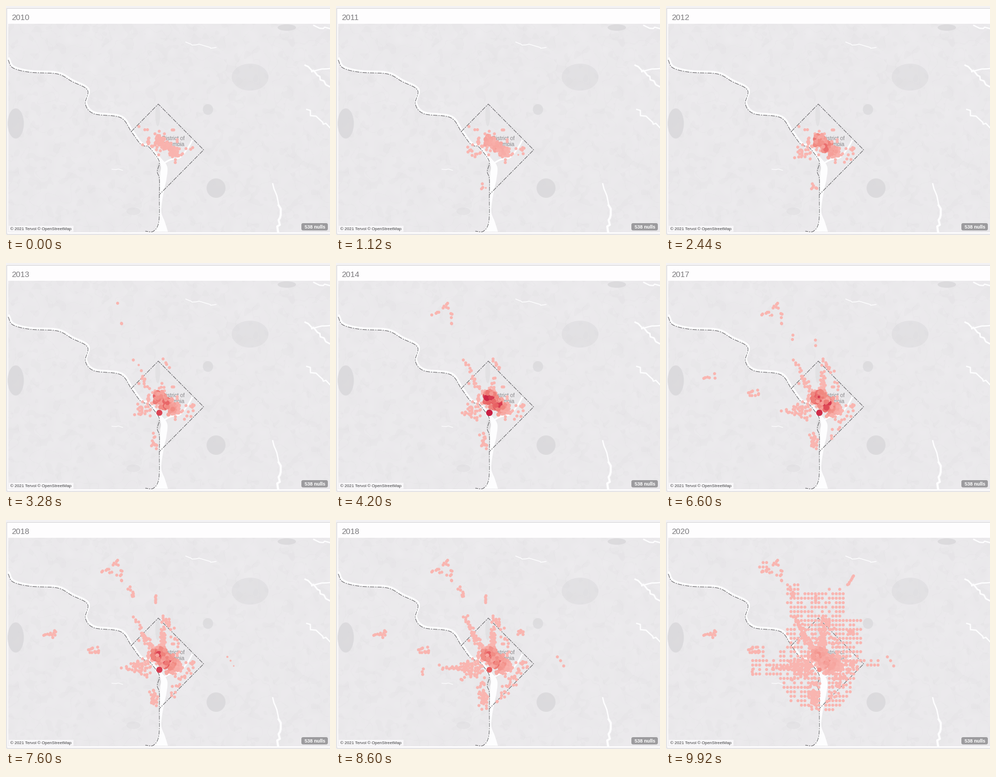
Recreate the animation shown at these times as a matplotlib script. Size 600 by 425 pixels, loop 9.96 s.

```python
import numpy as np
import matplotlib.pyplot as plt
from matplotlib.animation import FuncAnimation
from matplotlib.colors import LinearSegmentedColormap
from matplotlib.patches import Ellipse, FancyBboxPatch, Polygon, Rectangle
from matplotlib.path import Path

W, H, STEP, LOOP = 600, 425, 40, 9960
PX = 0.72  # points per pixel at 100 dpi
WATER = "#fdfdfe"
rng = np.random.default_rng(11)

fig = plt.figure(figsize=(W / 100, H / 100), dpi=100, facecolor="#f3f2f4")
ax = fig.add_axes([0, 0, 1, 1])
ax.set(xlim=(0, W), ylim=(H, 0))
ax.axis("off")


def line(xy, color, width, **kw):
    ax.plot(*np.asarray(xy).T, color=color, lw=width * PX, zorder=3, **kw)


def label(x, y, s, size, color, **kw):
    kw = {"family": "Liberation Sans", "va": "center_baseline", "zorder": 4} | kw
    return ax.text(x, y, s, fontsize=size * PX, color=color, **kw)


def smooth(points, n=8):
    """Catmull-Rom curve through the points."""
    p = np.array(points, float)
    p = np.vstack([2 * p[0] - p[1], p, 2 * p[-1] - p[-2]])
    u = np.linspace(0, 1, n, endpoint=False)[:, None]
    parts = [b + u * (c - a) / 2 + u ** 2 * (a - 2.5 * b + 2 * c - d / 2)
             + u ** 3 * (1.5 * (b - c) + (d - a) / 2)
             for a, b, c, d in zip(p, p[1:], p[2:], p[3:])]
    return np.vstack(parts + [p[-2:-1]])


# ---- base map ----
def noise(shape, scale):
    ky = np.fft.fftfreq(shape[0])[:, None]
    kx = np.fft.rfftfreq(shape[1])[None, :]
    soft = np.exp(-20 * scale ** 2 * (kx ** 2 + ky ** 2))
    n = np.fft.irfft2(np.fft.rfft2(rng.normal(size=shape)) * soft, shape)
    return n / n.std()


def draw_land():
    shape = (387, 596)
    tone = 235 + 0.6 * noise(shape, 6)
    tone -= 2.5 * (noise(shape, 4) > 1.0)
    tone -= 2 * (np.abs(noise(shape, 7)) < 0.09)
    rgb = tone[..., None] + np.array([0, -1.5, 1])
    ax.imshow(np.clip(rgb, 0, 255).astype(np.uint8), extent=(4, 600, 420, 33),
              interpolation="nearest", aspect="auto", zorder=1)
    parks = ((452, 132, 68, 50, 0.4), (18, 218, 30, 56, 0.7), (389, 338, 35, 36, 0.7),
             (374, 192, 19, 20, 0.6), (520, 40, 34, 12, 0.7), (281, 203, 9, 40, 0.4),
             (236, 381, 26, 14, 0.3))
    for x, y, w, h, alpha in parks:
        ax.add_patch(Ellipse((x, y), w, h, color="#d6d5d8", alpha=alpha, lw=0,
                             zorder=2))


def creek(x0, y0, x1, y1, width, wobble=4):
    n = max(4, int(np.hypot(x1 - x0, y1 - y0) / 6))
    path = np.linspace((x0, y0), (x1, y1), n)
    path[1:-1] += rng.uniform(-wobble, wobble, (n - 2, 2))
    line(path, WATER, width)


upper = smooth([(4, 100), (13, 115), (45, 123), (95, 126), (122, 140), (151, 156),
                (147, 182), (163, 200), (212, 207), (232, 233), (250, 257), (263, 260)])
bank = smooth([(263, 260), (271, 269), (284, 289), (280, 307), (284, 320), (284, 350),
               (283, 400), (273, 418), (258, 418)])
channel = smooth([(266, 260, 5), (282, 281, 8), (292, 298, 13), (291, 322, 12),
                  (288, 345, 8), (285, 380, 5), (288, 400, 12), (287, 419, 26)])
half = channel[:, 2:] / 2 * [1, 0]
basin = np.vstack([channel[:, :2] - half, (channel[:, :2] + half)[::-1]])


def draw_water():
    line(upper + [1.2, -2], WATER, 4.5)
    ax.add_patch(Polygon(basin, color=WATER, lw=0, zorder=3))
    ax.add_patch(Ellipse((283, 300), 8, 18, color="#dfdee0", lw=0, zorder=3))
    line(smooth([(292, 292), (305, 285), (322, 281), (337, 263), (346, 247)]), WATER, 3)

    creek(333, 67, 389, 77, 1.5)
    creek(554, 110, 600, 150, 3)
    creek(566, 122, 600, 116, 2.5)
    creek(557, 192, 600, 226, 2.5)
    creek(570, 36, 600, 42, 2.5)
    creek(494, 330, 505, 370, 2.5, 2)
    creek(505, 370, 504, 420, 4)
    creek(196, 303, 216, 305, 1.2, 2)

    for path in (np.vstack([upper, bank]),
                 [(232, 233), (282, 182), (366, 267), (284, 350)]):
        line(path, "#5f5e61", 1, dashes=(8, 1.8, 2.2, 1.8))


def draw_frame():
    ax.add_patch(Rectangle((0.5, 3.5), 602, 419, fc="#fefdfe", ec="#d5d4d6",
                           lw=PX, zorder=0))
    label(309.5, 244.5, "District of", 10, "#8b8a8d", ha="center")
    label(309.5, 256, "Columbia", 10, "#8b8a8d", ha="center")
    ax.add_patch(Rectangle((5, 408), 120, 11, fc="#f8f7f9", lw=0, zorder=3))
    label(7.5, 413.5, "© 2021 Tervol © OpenStreetMap", 7.8, "#3c3c3e")
    ax.add_patch(FancyBboxPatch((550, 406), 43, 7.5, fc="#9c9b9e", lw=0, zorder=3,
                                boxstyle="round,pad=3,rounding_size=3"))
    label(572, 409.7, "538 nulls", 9, "white", ha="center", weight="bold")


# ---- marks: x, y, weight, time of appearance ----
marks = []
OPEN, EARLY, MID = (-400, -200), (320, 1950), (2560, 4080)
LATER, SPREAD, LATE, LAST = (4200, 5560), (5680, 7480), (7600, 8300), (9480, 9800)


def add(xy, born, weight=0.0):
    columns = np.column_stack(np.broadcast_arrays(*np.transpose(xy), weight, born))
    marks.append(columns[~Path(basin).contains_points(columns[:, :2])])


def cloud(n, x, y, sx, sy, era):
    xy = np.clip(rng.normal(size=(n, 2)), -2, 2) * [sx, sy] + [x, y]
    add(xy, rng.uniform(*era, n))


def street(n, start, end, spread, era):
    xy = np.linspace(start, end, n) + rng.uniform(-spread, spread, (n, 2))
    add(xy, rng.uniform(*era, n))


def grid(outline, keep):
    """Rounded coordinates: a lattice of marks inside an outline."""
    lattice = np.stack(np.meshgrid(225 + 6.45 * np.arange(-24, 32),
                                   79 + 8.27 * np.arange(36)), -1).reshape(-1, 2)
    cells = lattice[Path(outline).contains_points(lattice)]
    cells = cells[rng.random(len(cells)) < keep]
    add(cells, rng.uniform(*LAST, len(cells)))


def box(x0, y0, x1, y1):
    return [(x0, y0), (x1, y0), (x1, y1), (x0, y1)]


def add_grid():
    grid([(222, 116), (243, 116), (262, 132), (330, 126), (328, 183), (363, 184),
          (363, 258), (345, 314), (330, 340), (300, 357), (262, 347), (230, 338),
          (209, 292), (209, 240), (230, 232), (222, 205), (236, 190), (219, 158)], 0.8)
    grid(box(157, 232, 182, 290), 0.75)
    grid(box(182, 257, 210, 290), 0.6)
    grid(box(355, 256, 402, 272), 0.7)
    grid(box(170, 76, 190, 100), 0.7)
    street(7, (347, 103), (337, 121), 1, LAST)


def add_suburbs():
    street(8, (180, 97), (207, 77), 3, MID)
    street(7, (207, 79), (217, 115), 3, MID)
    street(5, (180, 92), (214, 105), 4, SPREAD)
    cloud(4, 78, 213, 4, 1.5, LATER)
    cloud(7, 88, 213, 4, 6, SPREAD)
    cloud(9, 162, 240, 5, 4, LATER)
    cloud(6, 166, 242, 5, 3, SPREAD)
    street(8, (228, 126), (237, 140), 4, SPREAD)
    street(5, (277, 140), (278, 154), 1, SPREAD)
    street(3, (408, 253), (420, 269), 2, (7480, 7580))
    cloud(8, 342, 207, 5, 4, LATE)
    street(3, (161, 276), (160, 287), 1, LATE)


def add_city():
    cloud(28, 287, 254, 17, 12, OPEN)
    street(8, (312, 292), (345, 260), 5, OPEN)
    street(7, (252, 222), (268, 258), 6, OPEN)
    cloud(24, 255, 270, 10, 7, EARLY)
    cloud(7, 276, 336, 4, 3, EARLY)
    street(8, (334, 289), (350, 262), 4, EARLY)

    street(9, (238, 178), (254, 214), 3, MID)
    street(8, (289, 181), (304, 198), 3, MID)
    street(9, (291, 214), (289, 236), 4, MID)
    street(10, (253, 212), (272, 244), 4, MID)
    street(12, (270, 316), (275, 342), 5, MID)
    street(9, (234, 276), (262, 290), 4, MID)

    street(10, (291, 203), (289, 230), 4, LATER)
    street(9, (224, 276), (262, 266), 4, LATER)
    cloud(16, 273, 334, 4, 6, LATER)

    street(18, (250, 206), (274, 244), 5, SPREAD)
    street(18, (293, 184), (291, 230), 6, SPREAD)
    street(14, (218, 273), (268, 264), 5, SPREAD)
    street(14, (302, 330), (335, 282), 7, SPREAD)
    street(12, (300, 190), (324, 240), 8, SPREAD)

    street(16, (194, 273), (244, 276), 4, LATE)
    street(22, (236, 290), (274, 276), 8, LATE)
    street(24, (268, 296), (273, 344), 8, LATE)
    street(16, (300, 340), (355, 266), 7, LATE)
    street(14, (242, 178), (262, 225), 4, LATE)

    for end in ((250, 195), (292, 180), (232, 270), (273, 348), (340, 264), (318, 300)):
        street(28, (290, 256), end, 9, LAST)


def add_core():
    """Dense downtown stations, spreading out as the system grows."""
    n = 390
    age = np.sort(np.clip(rng.uniform(-0.6, 1, n), 0, 1))
    centre = np.array([(285, 249), (297, 260), (311, 271)])[rng.integers(0, 3, n)]
    xy = centre + np.clip(rng.normal(size=(n, 2)), -1.8, 1.8) * (4.8 + 3.2 * age[:, None])
    gap = [np.hypot(*(xy - c).T) for c in ((282, 250), (299, 263))]
    near = np.exp(-np.min(gap, axis=0) ** 2 / 320)
    born = np.where(age > 0, 320 + 6800 * age, -200)
    add(xy, born, near * rng.uniform(0.25, 0.95, n))
    add([(276, 271), (279, 273), (284, 278)], 2600, 0.95)


draw_land()
draw_water()
draw_frame()
add_grid()
add_suburbs()
add_city()
add_core()

X, Y, weight, born = np.vstack(marks).T
ramp = LinearSegmentedColormap.from_list(
    "reds", ["#f9b5b0", "#f6a49e", "#f08880", "#e65a5e", "#c2103c"])
dots = ax.scatter(X, Y, s=1, linewidths=0, zorder=5)
title = label(10, 26.3, "2010", 14.8, "#7b7a7d", va="baseline")

YEAR_STARTS = np.array([320, 1360, 2560, 3560, 4560, 5560, 6560, 7500, 8640, 9560])
PAUSES = ((0, 320), (1120, 1360), (1720, 1880), (2000, 2160), (2440, 2560),
          (8360, 8600), (9360, 9560))
HEAT_T = (320, 2440, 4200, 5680, 7600, 8600, 9360, 9920)
HEAT = (0.08, 0.75, 1.0, 1.0, 0.9, 0.78, 0.7, 0.45)


def update(i):
    t = i * STEP
    title.set_text(str(2010 + int(np.sum(YEAR_STARTS <= t))))
    for start, end in PAUSES:
        if start <= t < end:
            t = start
    value = weight * np.interp(t, HEAT_T, HEAT)
    grow = np.clip((t - born) / 100, 0, 1)
    radius = (2.8 + 3.4 * value) * grow
    dots.set_sizes((2 * radius * PX) ** 2)
    dots.set_facecolor(ramp(value))
    return dots, title


anim = FuncAnimation(fig, update, frames=LOOP // STEP, interval=STEP,
                     repeat=True, repeat_delay=0, blit=False)
plt.show()
```
